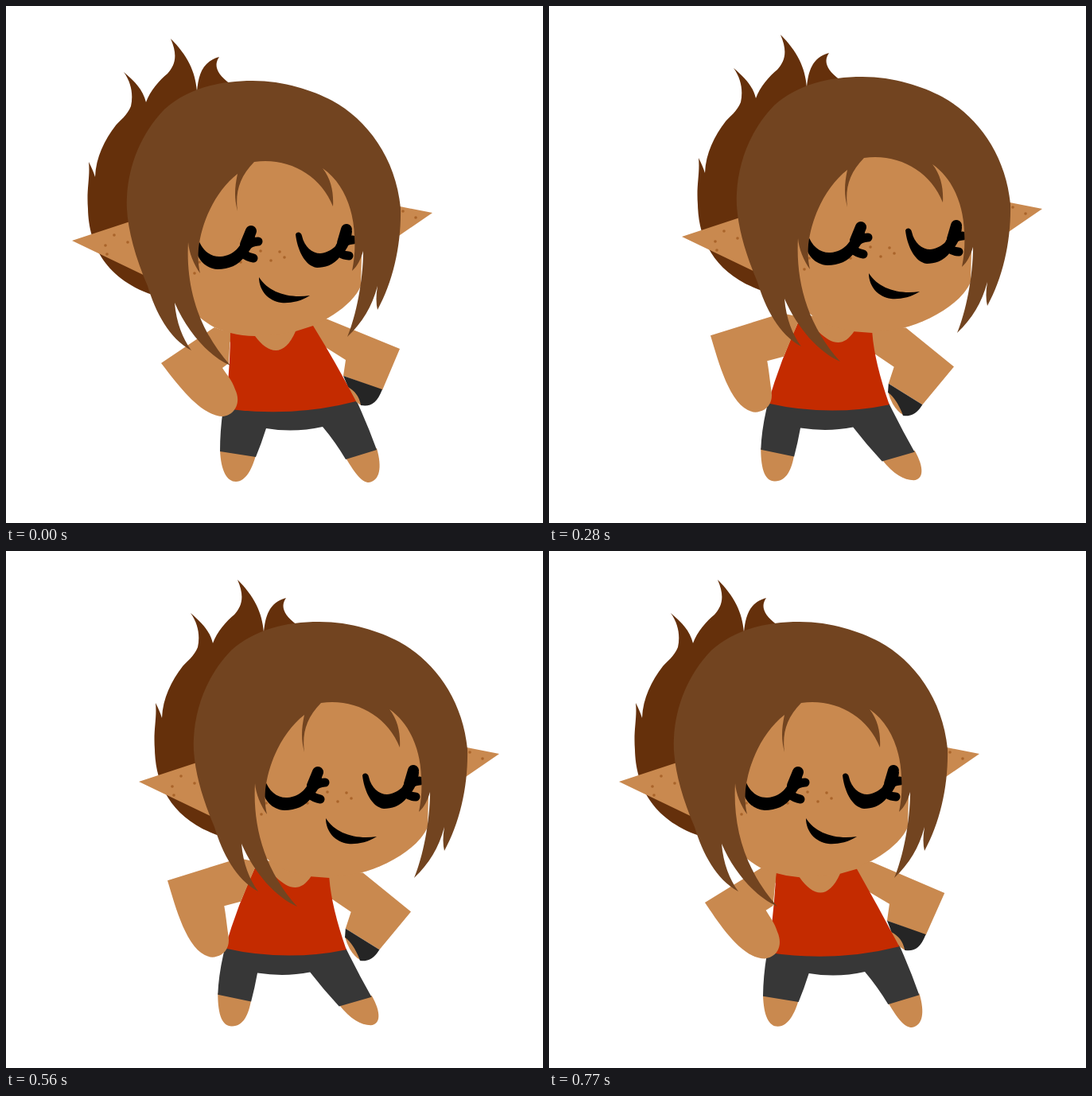
Animation of 675x650 px, one loop 0.84 s. Source, as an HTML page:

```html
<!DOCTYPE html>
<html lang="en">
<head>
<meta charset="utf-8">
<title>Swaying elf</title>
<style>
  html, body { margin: 0; width: 100%; height: 100%; overflow: hidden; background: #fff; }
  svg { display: block; width: 675px; height: 650px; }
  .skin { fill: #c9894f; }
  .bun { fill: #65300b; }
  .hair { fill: #724420; }
  .red { fill: #c42b00; }
  .shorts { fill: #373737; }
  .band { fill: #252525; }
  .dots { fill: #a9642a; }
  .lash { fill: none; stroke: #000; stroke-linecap: round; }
</style>
</head>
<body>
<svg viewBox="0 0 675 650">
  <g class="head">
    <path class="bun" d="M300 200L282 98C264 85 261 74 268 64C246 70 242 88 240 107C238 82 228 62 207 41C216 62 213 74 203 85C193 93 181 107 176 121C172 105 162 95 148 83C158 97 160 112 157 126C152 138 144 143 138 150C124 168 113 190 112 215C110 208 107 202 104 196C106 215 101 230 103 255C104 300 125 345 190 365Z"/>
  </g>
  <path id="feet" class="skin"/>
  <path id="shorts" class="shorts"/>
  <path id="neck" class="skin"/>
  <path id="armR" class="skin"/>
  <path id="hand" class="skin"/>
  <path id="band" class="band"/>
  <g class="head">
    <path class="skin" d="M205 300C205 340 218 380 262 404C290 417 330 416 360 410C395 402 435 378 446 352L450 200L300 170L240 220Z"/>
    <path class="skin" d="M83 295L165 268L185 344ZM485 250L536 260L485 295Z"/>
    <g id="dots" class="dots"></g>
    <path d="M241 291C246 308 258 316 270 315C286 314 297 302 301 284L313 287C313 300 306 308 300 315C292 326 280 331 266 331C250 330 240 318 238 303Z"/>
    <path d="M364 287C366 283 371 284 372 289C375 303 385 311 395 311C408 310 420 300 424 284L435 283C434 300 425 310 420 315C412 326 400 329 391 329C375 327 366 305 364 287Z"/>
    <path class="lash" stroke-width="14" d="M301 300L308 283M423 298L428 281"/>
    <path class="lash" stroke-width="11" d="M300 304Q308 296 317 296M298 311Q304 316 311 317M420 302Q427 294 436 294M419 310Q425 314 431 314"/>
    <path d="M318 341C330 360 355 368 382 364C370 372 355 374 346 373C330 371 318 358 318 341Z"/>
  </g>
  <path id="shirt" class="red"/>
  <path id="armL" class="skin"/>
  <g class="head">
    <path class="hair" d="M152 240C154 200 170 160 199 130C228 104 267 94 310 94C350 94 385 106 410 119C454 143 490 191 496 254C497 300 487 345 467 382Q464 370 467 352C460 378 448 398 429 416C440 390 449 345 449 308C446 318 442 327 435 333C438 318 439 305 438 290C437 255 424 222 398 204C409 218 412 235 411 252C395 212 355 190 312 196C293 215 288 235 291 258C287 242 287 230 291 211C264 232 246 270 242 305C241 318 242 328 244 336C236 325 230 310 229 297C226 350 240 405 282 452C255 440 228 410 212 373C214 398 222 418 233 433C205 418 188 385 178 352C160 310 150 270 152 240Z"/>
  </g>
</svg>
<script>
const STEP = 70, COUNT = 12;

// Half a sway: head offset and body pose; the way back mirrors it.
const sway = [
  { x: 0, y: 0, pose: 0 },
  { x: 5, y: -5, pose: 0.32 },
  { x: 23.4, y: -15, pose: 1 },
  { x: 54, y: -21, pose: 2 },
  { x: 84, y: -5, pose: 2.58 },
  { x: 100.5, y: 10.5, pose: 3 },
  { x: 107, y: 17.5, pose: 3.17 }
];

// Four poses of each body part, blended number by number.
const parts = {
  feet: [
    "M269 558C270 585 278 598 289 598C302 598 310 580 314 565ZM427 568C440 590 448 599 456 599C470 597 473 580 466 556Z",
    "M269 557C269 585 274 597 284 597C299 598 308 580 313 565ZM425 568C438 590 446 599 456 599C470 597 472 580 464 557Z",
    "M268 557C268 585 273 598 284 598C298 598 307 582 311 565ZM421 570C436 590 448 598 459 598C471 596 472 578 463 557Z",
    "M265 555C265 585 272 597 283 597C299 598 304 582 306 564ZM417 571C430 587 445 595 458 595C471 595 472 582 457 560Z"
  ],
  shorts: [
    "M274 500Q269 530 269 560L314 567Q321 550 327 531Q362 537 398 529Q414 548 427 570L466 558Q454 525 440 495Z",
    "M278 498Q270 530 269 559L313 567Q320 550 326 531Q362 537 395 529Q411 548 425 570L464 559Q453 525 440 495Z",
    "M275 498Q269 530 268 559L311 567Q318 550 323 530Q356 536 388 529Q403 552 421 572L463 559Q449 528 432 498Z",
    "M276 497Q266 530 265 557L306 566Q309 548 311 531Q346 536 378 530Q397 552 417 573L457 562Q439 535 424 501Z"
  ],
  neck: [
    "M270 402L388 398L370 450L283 425Z",
    "M283 383L391 385L376 440L292 410Z",
    "M316 375L404 375L390 430L330 430Z",
    "M325 400L409 400L395 450L345 450Z"
  ],
  armR: [
    "M350 395L402 393L495 431L473 483L424 465L427 445L400 428L370 440Z",
    "M355 385L413 386L502 428L475 483L427 464L430 441L404 428L376 430Z",
    "M365 380L433 382L509 424L481 474L432 458L436 434L407 418L390 420Z",
    "M380 410L460 421L509 475L461 521L423 487L432 468L409 450L395 450Z"
  ],
  hand: [
    "M428 476L440 480L447 502Q436 498 430 478Z",
    "M430 477L443 482L451 502Q440 499 430 478Z",
    "M433 471L450 474L458 494Q439 494 433 472Z",
    "M421 494L430 505L437 529Q428 518 421 495Z"
  ],
  band: [
    "M424 465L473 482C466 500 458 504 446 502C444 490 438 484 430 479Z",
    "M427 464L475 482C468 500 460 503 450 502C447 492 442 484 432 480Z",
    "M432 458L481 474C474 490 466 497 456 494C454 486 446 476 433 473Z",
    "M423 487L461 521C454 529 446 531 437 530C434 522 428 505 421 495Z"
  ],
  shirt: [
    "M282 411Q297 415 313 415C330 438 350 442 364 409L386 402Q415 449 440 497Q360 518 274 506Q281 475 282 411Z",
    "M293 392Q306 397 319 400C338 430 354 430 370 399L389 395Q413 446 441 498Q360 517 277 502Q283 450 293 392Z",
    "M312 380Q322 385 334 389C352 421 368 421 384 393L404 390Q408 432 433 500Q355 518 274 500Q286 445 312 380Z",
    "M319 399Q330 412 343 425C360 430 372 434 383 421L408 426Q410 460 424 502Q350 516 276 499Q294 447 319 399Z"
  ],
  armL: [
    "M262 404L195 449C215 475 245 516 273 516C288 514 296 498 288 482C284 470 277 463 272 455L280 449L282 411Z",
    "M278 386L198 427C212 455 235 505 268 505C284 503 292 492 285 472C282 460 277 452 274 445L285 440L293 392Z",
    "M283 381L203 412C215 445 235 500 267 502C281 501 289 490 284 470C283 455 279 445 276 437L291 432L312 380Z",
    "M300 390L203 416C212 450 224 515 254 517C268 516 278 506 276 492C273 475 274 465 273 453L298 447L319 399Z"
  ]
};

const freckles = [
  [125, 301], [136, 288], [153, 297], [127, 312], [499, 258], [515, 266],
  [320, 308], [333, 320], [344, 309], [350, 316], [237, 336], [243, 322], [295, 322]
];
document.getElementById("dots").innerHTML =
  freckles.map(([x, y]) => `<circle cx="${x}" cy="${y}" r="1.8"/>`).join("");

const heads = document.querySelectorAll(".head");
const nodes = Object.keys(parts).map(id => [document.getElementById(id), parts[id]]);

function blend(a, b, k) {
  const to = b.match(/\d+/g);
  let i = 0;
  return a.replace(/\d+/g, n => (+n + (to[i++] - n) * k).toFixed(2) + " ");
}

function draw(ms) {
  const step = Math.floor(ms / STEP) % COUNT;
  const { x, y, pose } = sway[Math.min(step, COUNT - step)];
  const from = Math.min(Math.floor(pose), 2);
  heads.forEach(h => h.setAttribute("transform", `translate(${x} ${y})`));
  nodes.forEach(([el, d]) => el.setAttribute("d", blend(d[from], d[from + 1], pose - from)));
}

const start = performance.now();
function tick() {
  draw(performance.now() - start);
  requestAnimationFrame(tick);
}
tick();
</script>
</body>
</html>
```
